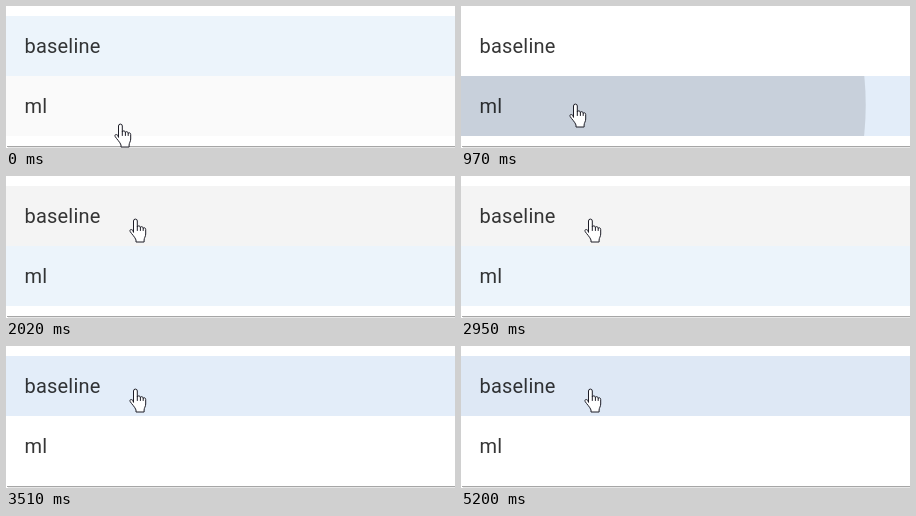
Recreate the animation shown at these times as an HTML page. Size 449 px wide and 142 px high, loop 5.27 s.

```html
<!DOCTYPE html>
<html lang="en">
<head>
<meta charset="utf-8">
<title>Option list</title>
<style>
  html, body { margin: 0; width: 100%; height: 100%; overflow: hidden; background: #fff; }
  svg { display: block; width: 100%; height: 100%; }
  text { font: 400 20px Roboto, Arial, sans-serif; letter-spacing: .2px; fill-opacity: .79; }
  #hand path { fill: #fff; stroke: #1c1c26; stroke-width: 1; stroke-linejoin: round; stroke-linecap: round; }
  #hand .gaps { fill: none; }
</style>
</head>
<body>
<svg viewBox="0 0 449 142">
  <defs>
    <clipPath id="clipTop"><rect y="10" width="449" height="60"/></clipPath>
    <clipPath id="clipLow"><rect y="70" width="449" height="60"/></clipPath>
  </defs>
  <rect width="449" height="142" fill="#fff"/>
  <rect id="rowTop" y="10" width="449" height="60"/>
  <rect id="rowLow" y="70" width="449" height="60"/>
  <text x="18.5" y="47">baseline</text>
  <text x="18.5" y="107">ml</text>
  <g clip-path="url(#clipLow)"><circle id="rippleLow" cx="114.5" cy="99"/></g>
  <g clip-path="url(#clipTop)"><circle id="rippleTop" cx="129" cy="44"/></g>
  <rect x="1" y="140" width="448" height="1" fill="#a6a6a6"/>
  <rect x="2" y="141" width="447" height="1" fill="#e6e6e6"/>
  <g id="hand">
    <path d="M4.5 14V3a1.9 1.9 0 0 1 3.8 0V9c0-1.5 3.1-1.5 3.1.4c.3-1.2 2.8-.9 2.8.9c.5-1 2.5-.7 2.5 1.2V16c0 2.5-1.6 4-1.6 6v2H7v-2C6 19 2.6 16 1.2 13.6C.3 11.7 2.1 10.7 3.6 12.2Z"/>
    <path class="gaps" d="M8.3 9v3.5M11.4 9.5v3M14.2 10.4v2.1"/>
  </g>
</svg>
<script>
const LOOP = 5270, STEP = 70;
const bursts = [0, 620, 1190, 2020, 2880, 5130]; // when the picture starts to move again
const $ = id => document.getElementById(id);

const color = {
  plain: [255, 255, 255],
  faint: [250, 250, 250],
  hover: [244, 244, 244],
  selected: [236, 244, 251],
  active: [227, 237, 249],
  pressed: [222, 232, 245]
};

// Row states, each fading in from its time on.
const phases = [
  { at: -STEP, top: "selected", low: "faint" },
  { at: STEP, top: "selected", low: "hover" },
  { at: 830, top: "plain", low: "active" },
  { at: 1610, top: "hover", low: "selected" },
  { at: 3020, top: "active", low: "plain" },
  { at: 5060, top: "pressed", low: "plain" }
];

const clamp = x => Math.min(1, Math.max(0, x));
const progress = (t, from, to) => clamp((t - from) / (to - from));
const mix = (a, b, p) => a + (b - a) * p;

// cubic-bezier(0, 0, .2, 1)
function decelerate(x) {
  let lo = 0, hi = 1;
  for (let i = 0; i < 24; i++) {
    const m = (lo + hi) / 2;
    if (.6 * (1 - m) * m * m + m ** 3 < clamp(x)) lo = m; else hi = m;
  }
  return 3 * (1 - lo) * lo * lo + lo ** 3;
}

function drawRow(id, side, t) {
  const n = phases.filter(p => p.at <= t).length - 1;
  const now = phases[n], before = phases[Math.max(0, n - 1)];
  const p = progress(t, now.at, now.at + STEP);
  const rgb = color[now[side]].map((v, i) => Math.round(mix(color[before[side]][i], v, p)));
  $(id).setAttribute("fill", `rgb(${rgb})`);
}

function drawRipple(id, start, size, alpha, t) {
  const fade = decelerate((t - start - 240) / 300);
  $(id).setAttribute("r", size * decelerate((t - start) / 450));
  $(id).setAttribute("fill-opacity", alpha * (1 - fade));
}

function drawHand(t) {
  const rise = progress(t, 0, 350), move = progress(t, 1260, 2020);
  const x = Math.round(mix(108, 123, move));
  const y = Math.round(mix(mix(117, 97, rise), 42, move));
  $("hand").setAttribute("transform", `translate(${x} ${y})`);
}

function draw(time) {
  const from = bursts.filter(s => s <= time).pop();
  const t = from + Math.floor((time - from) / STEP) * STEP;
  drawRow("rowTop", "top", t);
  drawRow("rowLow", "low", t);
  drawRipple("rippleLow", 729, 336, .125, t);
  drawRipple("rippleTop", 2958, 321, .16, t);
  drawHand(t);
}

function tick() {
  draw(performance.now() % LOOP);
  requestAnimationFrame(tick);
}
tick();
</script>
</body>
</html>
```
